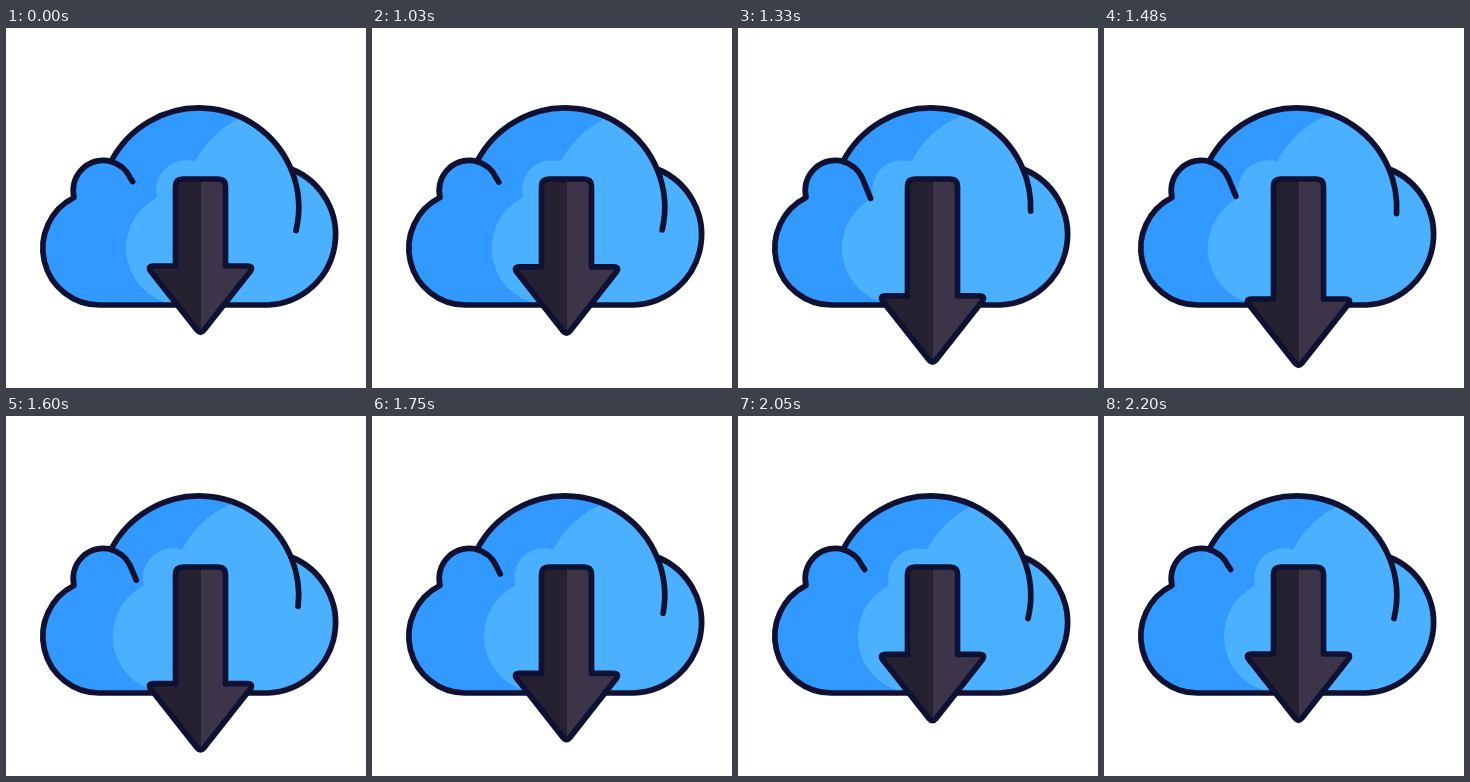
An HTML page for the animation above (2230 ms loop, 360x360 px).

```html
<!DOCTYPE html>
<html lang="en">
<head>
<meta charset="utf-8">
<title>Cloud download</title>
<style>
  html, body { margin: 0; height: 100%; overflow: hidden; background: #fff; }
  svg { display: block; width: 100vw; height: 100vh; }
  .line { fill: none; stroke: #0f1132; stroke-width: 5.7; stroke-linecap: round; stroke-linejoin: round; }
</style>
</head>
<body>
<svg viewBox="0 0 360 360">
  <defs>
    <path id="cloud" d="M94 277A56.8 56.8 0 0 1 68 169.5A30 30 0 0 1 105 133.5A99.5 99.5 0 0 1 285 141A70.5 70.5 0 0 1 262 277Z"/>
    <clipPath id="inside"><use href="#cloud"/></clipPath>
    <linearGradient id="metal" gradientUnits="userSpaceOnUse" x1="0" x2="360" y1="0" y2="0">
      <stop offset=".5403" stop-color="#262130"/>
      <stop offset=".5403" stop-color="#3c354a"/>
    </linearGradient>
  </defs>
  <use href="#cloud" fill="#3199ff"/>
  <g clip-path="url(#inside)">
    <path id="light" fill="#4bb0ff" d="M94 277A56.8 56.8 0 0 1 68 169.5A30 30 0 0 1 106 133.5A100 100 0 0 1 193 80H400V277Z"/>
  </g>
  <use href="#cloud" class="line"/>
  <path id="leftTail" class="line"/>
  <path id="rightTail" class="line"/>
  <path id="arrow" class="line" style="fill:url(#metal)"/>
</svg>
<script>
  const LOOP = 2230, START = 1030, STEP = 30;
  const $ = id => document.getElementById(id);

  const ease = (t, from, to) => {
    const x = Math.min(1, Math.max(0, (t - from) / (to - from)));
    return x * x * (3 - 2 * x);
  };
  // Rises from a to b, falls from c to d.
  const pulse = (t, a, b, c, d) => ease(t, a, b) - ease(t, c, d);

  function draw(now) {
    const time = now % LOOP;
    const t = time < START ? 0 : time - (time - START) % STEP;

    const shift = 83.1 - 17 * pulse(t, 1000, 1390, 1390, 2080);
    $('light').setAttribute('transform', `translate(${shift})`);

    const tail = pulse(t, 990, 1340, 1340, 1960);
    $('leftTail').setAttribute('d',
      `M105 133.5A30 30 0 0 1 124.3 150L${126.6 + 6 * tail} ${153.5 + 17 * tail}`);
    const endY = 202.5 - 19.5 * tail;
    const endX = 193.2 + Math.sqrt(99.5 ** 2 - (endY - 179.5) ** 2);
    $('rightTail').setAttribute('d', `M285 141A99.5 99.5 0 0 1 ${endX} ${endY}`);

    const head = 238 + 33 * pulse(t, 990, 1410, 1480, 2090);
    $('arrow').setAttribute('d',
      `M177 151H212q7.5 0 7.5 7.5V${head}H241.5q6 0 3 5L197.8 ${head + 64.3}` +
      `q-3.3 4 -6.6 0L144.5 ${head + 5}q-3 -5 3 -5H169.5V158.5q0 -7.5 7.5 -7.5Z`);

    requestAnimationFrame(draw);
  }
  draw(0);
</script>
</body>
</html>
```
